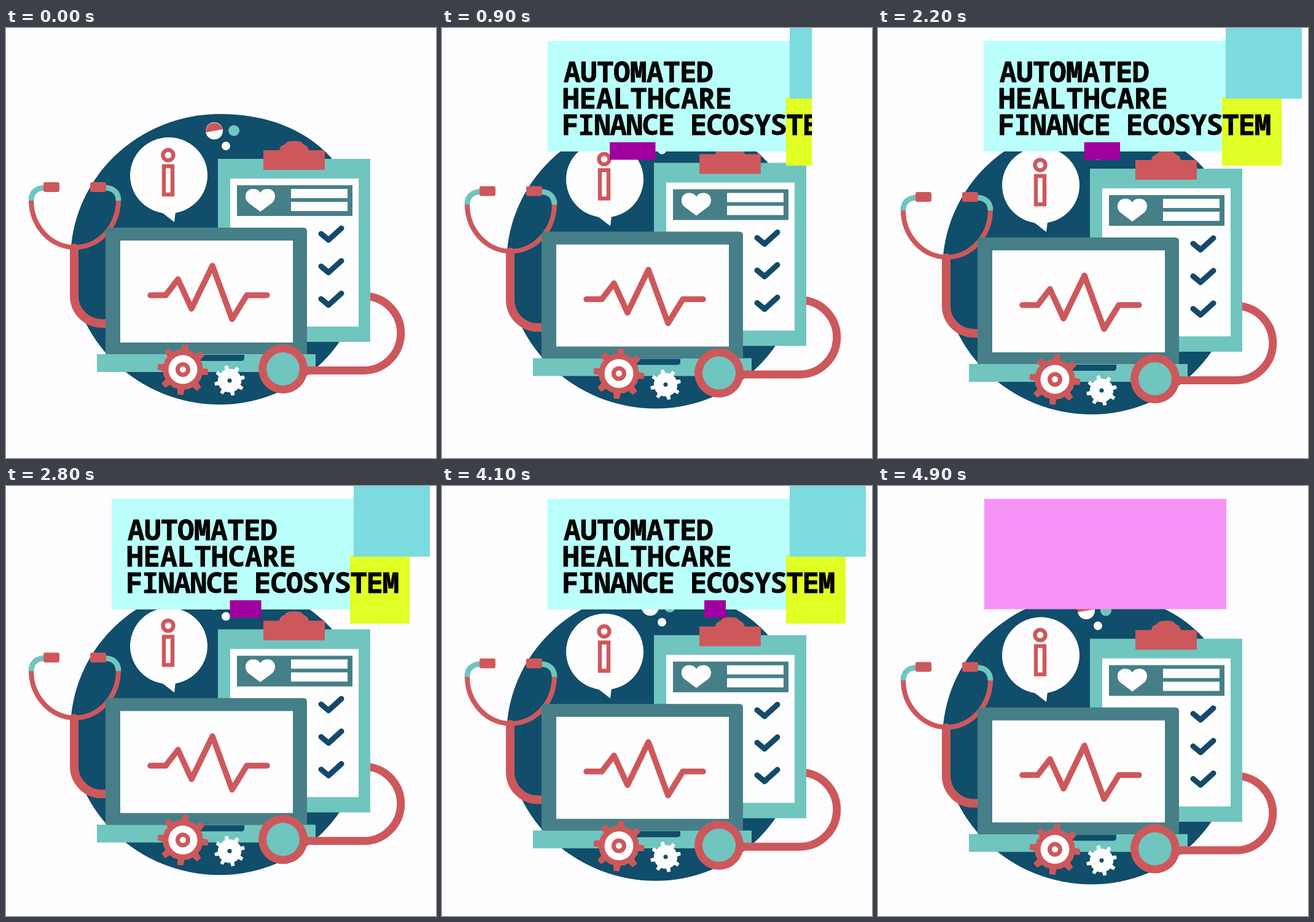
An HTML page that plays this animation: 700x700 px, repeating every 5000 ms.

```html
<!DOCTYPE html>
<html lang="en">
<head>
<meta charset="utf-8">
<title>Automated healthcare finance ecosystem</title>
<style>
  html, body { margin: 0; width: 100%; height: 100%; overflow: hidden; background: #fdfcfe; }
  svg { display: block; width: 100%; height: 100%; }
  .red { fill: #cd585c; }
  .teal { fill: #70c5be; }
  .slate { fill: #467f87; }
  .navy { fill: #104e6b; }
  .white { fill: #fefdfe; }
  .line { fill: none; stroke: #cd585c; stroke-linecap: round; stroke-linejoin: round; }
  .tip { stroke: #70c5be; stroke-linecap: butt; }
  .tick { stroke: #13496a; }
  .title {
    font: 700 46px "Noto Sans Mono", "DejaVu Sans Mono", monospace;
    fill: #050505; stroke: #050505; stroke-width: .8; stroke-linejoin: round;
  }
</style>
</head>
<body>
<svg viewBox="0 0 700 700">
  <defs>
    <clipPath id="reveal"><rect id="window" y="0" height="240"/></clipPath>
    <path id="tick" class="line tick" stroke-width="9" d="M513 335L525 345L546 326"/>
  </defs>

  <g id="scene">
    <path class="navy" d="M105 376A243 236 0 0 1 348 140C430 140 490 168 530 212L585 376A237 237 0 0 1 348 613A243 237 0 0 1 105 376Z"/>

    <!-- bubble and dots -->
    <ellipse class="white" cx="265" cy="240" rx="63" ry="62"/>
    <path class="white" d="M246 297L256 302L274 316L276 299Z"/>
    <circle class="line" cx="264" cy="207" r="8.5" stroke-width="6.4"/>
    <path class="line" stroke-width="6.4" style="stroke-linejoin:miter" d="M257 225H271V271H257Z"/>
    <circle class="white" cx="339" cy="167.5" r="14"/>
    <path class="red" d="M325 170A14 14 0 0 1 352.5 165Z"/>
    <circle class="teal" cx="371" cy="167" r="9"/>
    <circle class="white" cx="358" cy="192" r="7"/>

    <!-- tubes over the laptop base -->
    <rect class="teal" x="148" y="531" width="356" height="29"/>
    <path class="line" stroke-width="13" d="M480 557.5H583A60.6 60.6 0 0 0 587 436.5"/>
    <path class="line" stroke-width="14" d="M111 358V436A45 45 0 0 0 156 481H164"/>
    <path class="line" stroke-width="8" style="stroke-linecap:butt" d="M41 280A71 77 0 0 0 183 280"/>
    <path class="line tip" stroke-width="9" d="M41 281C41 268 49 260 64 260M183 281C183 268 175 260 160 260"/>
    <rect class="red" x="61" y="251" width="26" height="16" rx="3"/>
    <rect class="red" x="137" y="251" width="26" height="16" rx="3"/>

    <!-- clipboard -->
    <rect class="teal" x="345" y="213" width="248" height="298"/>
    <rect class="white" x="365" y="245" width="209" height="241"/>
    <path class="red" d="M419 231V199H445Q446 191 453 190Q457 184 464 184H474Q481 184 485 190Q491 191 493 199H519V231Z"/>
    <rect class="slate" x="376" y="256" width="188" height="50"/>
    <path class="white" d="M414 299L394 284C387 277 389 263 401 262Q410 261 414 268Q418 261 427 262C439 263 441 277 434 284Z"/>
    <rect class="white" x="464" y="262" width="92" height="15"/>
    <rect class="white" x="464" y="283" width="92" height="15"/>
    <use href="#tick"/>
    <use href="#tick" y="53"/>
    <use href="#tick" y="106"/>

    <!-- laptop -->
    <path class="slate" d="M162 531V331Q162 325 168 325H484Q490 325 490 331V531Z"/>
    <rect class="white" x="186" y="346" width="281" height="166"/>
    <path class="line" stroke-width="9.5" d="M235 435H260L280 409L302 457L336 387L368 474L392 435H425"/>
    <path class="navy" d="M312 532H388V537Q388 542 383 542H312Z"/>

    <!-- gears and chest piece -->
    <path id="bigGear" class="red"/>
    <circle class="white" cx="288" cy="556" r="23.5"/>
    <circle class="line" cx="288" cy="556" r="8.5" stroke-width="7"/>
    <path id="smallGear" class="white"/>
    <circle class="navy" cx="364" cy="574" r="3.5"/>
    <circle class="red" cx="451" cy="555" r="40"/>
    <circle class="teal" cx="451" cy="555" r="27"/>
  </g>

  <g clip-path="url(#reveal)">
    <rect x="172" y="21" width="395" height="180" fill="#bafffb"/>
    <rect x="560" y="113" width="97" height="111" fill="#e1ff25"/>
    <rect x="566" y="0" width="124" height="115" fill="#7cdbde"/>
    <rect id="tag" y="186" height="28.5" fill="#a0009f"/>
    <g class="title">
      <text x="198" y="88" letter-spacing="-.6">AUTOMATED</text>
      <text x="196" y="131">HEALTHCARE</text>
      <text x="195" y="174" letter-spacing="-1.5">FINANCE ECOSYSTEM</text>
    </g>
  </g>
  <rect id="blockIn" y="21" height="180.5" fill="#e4ff27"/>
  <rect id="blockOut" y="21" height="179.5" fill="#f792f6"/>
</svg>

<script>
const LOOP = 5000, STEP = 100;
const LEFT = 172, RIGHT = 567, END = 700;
const $ = id => document.getElementById(id);
const clamp = v => Math.min(1, Math.max(0, v));
const ease = p => 1 - (1 - p) ** 2;
const tween = (t, start, end, a, b) => a + (b - a) * ease(clamp((t - start) / (end - start)));

function gear(cx, cy, root, tip, teeth, phase) {
  const points = [];
  const pitch = 2 * Math.PI / teeth;
  const add = (r, a) => points.push(
    (cx + r * Math.cos(a)).toFixed(2) + " " + (cy + r * Math.sin(a)).toFixed(2));
  for (let i = 0; i < teeth; i++) {
    const a = phase + i * pitch;
    add(root, a - pitch * .23);
    add(tip, a - pitch * .14);
    add(tip, a + pitch * .14);
    add(root, a + pitch * .23);
    add(root * 1.02, a + pitch * .5);
  }
  return "M" + points.join("L") + "Z";
}

function span(id, from, to) {
  $(id).setAttribute("x", from);
  $(id).setAttribute("width", Math.max(0, to - from));
}

function draw(t) {
  $("scene").setAttribute("transform", `translate(0 ${(t * .00727).toFixed(2)})`);

  // Entry block grows, then wipes off to the right
  const trail = tween(t, 450, 850, LEFT, RIGHT);
  span("blockIn", trail, tween(t, 0, 400, LEFT, RIGHT));

  // Exit block grows over the title
  const cover = tween(t, 4400, 4800, LEFT + 1, RIGHT);
  span("blockOut", LEFT + 1, cover);

  const edge = t < 2500
    ? (t < 850 ? trail : tween(t, 850, 1200, RIGHT, END))
    : tween(t, 4400, 4800, END, RIGHT);
  span("window", t < 4400 ? LEFT : cover, edge);

  const s = (t - 1500) / 1000;
  span("tag", 302 + 48.1 * s, 369 + 35.8 * s);
}

$("bigGear").setAttribute("d", gear(288, 556, 32.5, 41.5, 8, .1));
$("smallGear").setAttribute("d", gear(364, 574, 19, 25, 8, .56));

const origin = performance.now();
function tick(now) {
  const t = Math.max(0, now - origin) % LOOP;
  draw(Math.floor(t / STEP) * STEP);
  requestAnimationFrame(tick);
}
draw(0);
requestAnimationFrame(tick);
</script>
</body>
</html>
```
